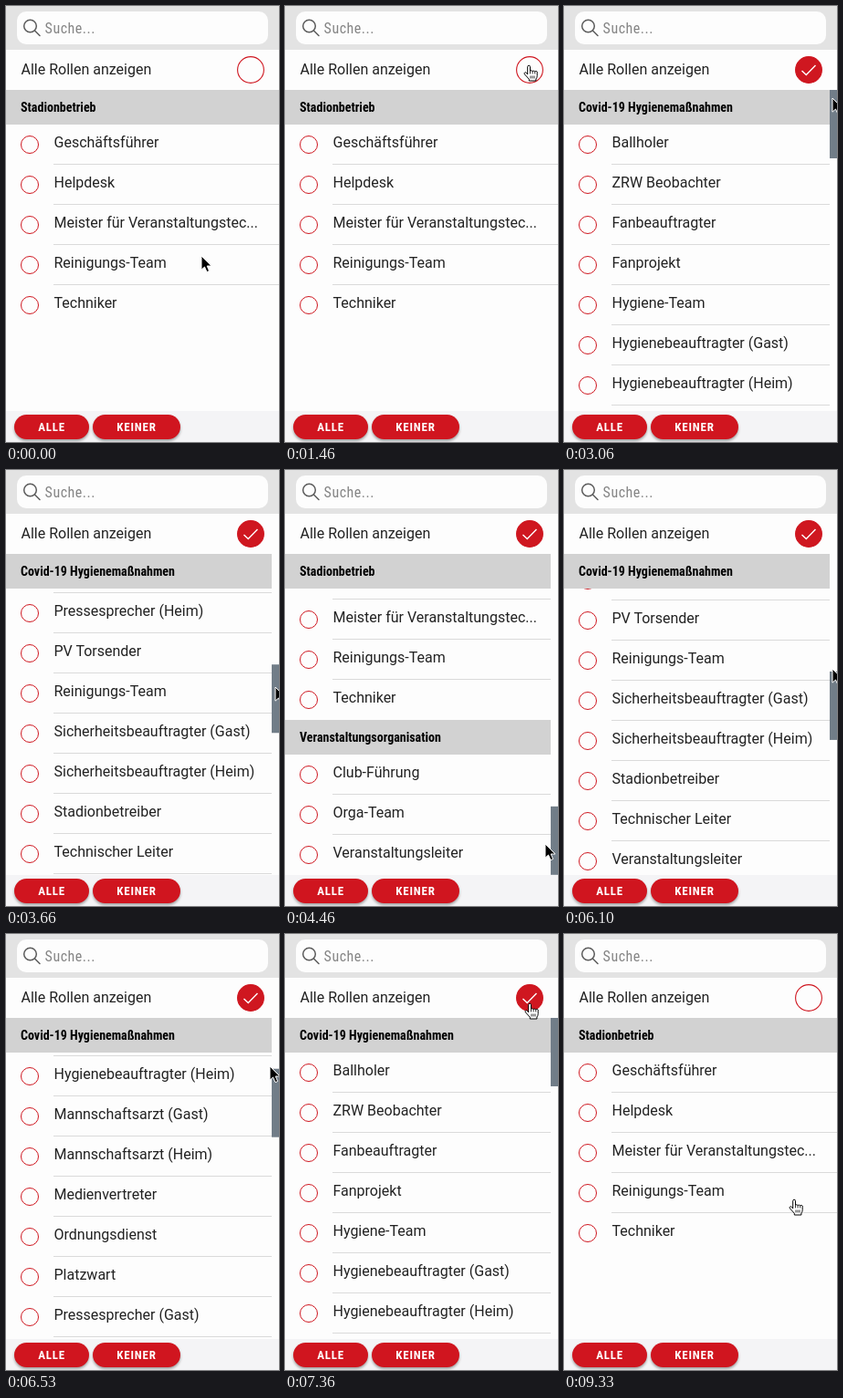
These frames come from a looping animation (299x478 px, 10000 ms). An HTML page:

```html
<!DOCTYPE html>
<html lang="de">
<head>
<meta charset="utf-8">
<title>Rollenauswahl</title>
<style>
  html, body { margin: 0; width: 100%; height: 100%; overflow: hidden; background: #fdfdfd; }
  body { position: relative; font: 16px/20px Roboto, sans-serif; color: #222; }
  body > *, .abs { position: absolute; box-sizing: border-box; }
  .condensed { font-family: "Roboto Condensed", Roboto, sans-serif; font-stretch: 75%; }

  #top { left: 0; top: 0; width: 100%; height: 48px; background: #e3e3e3; }
  #search { left: 12px; top: 6px; width: 275px; height: 36px; border-radius: 10px; background: #fdfdfd;
    padding: 9px 0 0 30.6px; color: #858585; letter-spacing: .5px; }
  #search svg { position: absolute; left: 5px; top: 6px; }
  #label { left: 16.5px; top: 60px; }
  #toggle { left: 253px; top: 55px; }

  #list { left: 0; top: 92px; height: 352px; overflow: hidden; }
  .head { position: sticky; top: 0; z-index: 1; height: 38px; padding-left: 16px; background: #d2d2d2;
    color: #000; font-weight: 700; font-size: 14px; line-height: 38px; white-space: nowrap; }
  .row { position: relative; height: 44px; }
  .row::before { content: ""; position: absolute; left: 16px; top: 12px; width: 20px; height: 20px;
    box-sizing: border-box; border: 1px solid #cf1720; border-radius: 50%; }
  .row span { position: absolute; left: 52px; right: 0; top: 0; height: 44px; box-sizing: border-box;
    padding: 10px 0 0 .5px; border-bottom: 1px solid #dadada; white-space: nowrap; }
  .row:last-child span { border: 0; }
  #thumb { right: 0; top: 92px; width: 8px; background: #717d88; }

  #bottom { left: 0; top: 444px; width: 100%; height: 34px; background: #f4f4f6; }
  .button { top: 4px; height: 27px; border-radius: 14px; background: #d0151f; color: #fff;
    font-weight: 700; font-size: 13px; line-height: 27px; letter-spacing: .78px; text-align: center;
    box-shadow: 0 2px 3px rgba(0, 0, 0, .35); }
  #cursor { left: 0; top: 0; width: 1px; height: 1px; overflow: visible; z-index: 5; }
</style>
</head>
<body>
  <div id="top">
    <div id="search" class="abs condensed">Suche...
      <svg width="24" height="24" fill="none" stroke="#5c5c5c" stroke-width="1.5" stroke-linecap="round">
        <circle cx="9.5" cy="10" r="6.8"/><path d="M14.5 15L20 20.5"/>
      </svg>
    </div>
  </div>
  <div id="label">Alle Rollen anzeigen</div>
  <svg id="toggle" width="30" height="30" fill="none">
    <circle cx="15" cy="15" r="14.4" stroke="#cf1720" stroke-width="1.1"/>
    <path d="M7.5 16L12.3 20.5L22.5 10" stroke="#fff" stroke-width="1.4"/>
  </svg>
  <div id="list"></div>
  <div id="thumb"></div>
  <div id="bottom">
    <div class="abs button condensed" style="left:9px;width:82px">ALLE</div>
    <div class="abs button condensed" style="left:95px;width:96px">KEINER</div>
  </div>
  <svg id="cursor">
    <path id="arrow" d="M0 0V15.2L3.5 12L6 17.6L8.6 16.5L6.2 11H11Z" fill="#000" stroke="#fff"/>
    <g id="hand" stroke="#000" stroke-linejoin="round">
      <path fill="#fff" d="M-1.3 10V1.6a1.4 1.4 0 0 1 2.8 0V6.4a1.4 1.2 0 0 1 2.6 .3a1.4 1.2 0 0 1 2.6 .6a1.3 1.3 0 0 1 2.5 .8V11.5q0 2-1.3 3.5V17H.3V15.2L-4.6 9.8q-.7-1.3 .4-2q1-.4 1.7 .6z"/>
      <path fill="none" stroke-width=".8" d="M1.5 6.4v3m2.6-2.7v2.7m2.6-2v2M2 11.5v3m2-3v3m2-3v3"/>
    </g>
  </svg>
<script>
const LOOP = 10000, CHECKED_AT = 1800, UNCHECKED_AT = 8100;
const VIEW = 352, SCROLL_LAG = 70, GRAB_Y = 101;

const groups = {
  'Covid-19 Hygienemaßnahmen': ['Ballholer', 'ZRW Beobachter', 'Fanbeauftragter', 'Fanprojekt',
    'Hygiene-Team', 'Hygienebeauftragter (Gast)', 'Hygienebeauftragter (Heim)',
    'Mannschaftsarzt (Gast)', 'Mannschaftsarzt (Heim)', 'Medienvertreter', 'Ordnungsdienst',
    'Platzwart', 'Pressesprecher (Gast)', 'Pressesprecher (Heim)', 'PV Torsender',
    'Reinigungs-Team', 'Sicherheitsbeauftragter (Gast)', 'Sicherheitsbeauftragter (Heim)',
    'Stadionbetreiber', 'Technischer Leiter', 'Veranstaltungsleiter'],
  'Sicherheit': ['Einsatzleiter', 'Feuerwehr', 'Ordnungsdienst', 'Polizei', 'Sanitätsdienst'],
  'Stadionbetrieb': ['Geschäftsführer', 'Helpdesk', 'Meister für Veranstaltungstec...',
    'Reinigungs-Team', 'Techniker'],
  'Veranstaltungsorganisation': ['Club-Führung', 'Orga-Team', 'Veranstaltungsleiter']
};

const steady = u => u;
const smooth = u => u * u * (3 - 2 * u);
const settle = u => 1 - (1 - u) ** 3;

const start = { x: 214, y: 274 };
const moves = [
  { from: 200, to: 1200, x: 267, y: 65, ease: smooth },    // to the toggle
  { from: 2030, to: 2560, x: 294, y: 101, ease: smooth },  // to the scrollbar
  { from: 3060, to: 3660, x: 295, y: 238, ease: steady },  // drag down
  { from: 3660, to: 4510, x: 284, y: 420, ease: steady },
  { from: 4930, to: 6100, x: 294, y: 218, ease: steady },  // drag up
  { from: 6100, to: 6860, x: 286, y: 89, ease: steady },
  { from: 7060, to: 7660, x: 265, y: 74, ease: settle },   // back to the toggle
  { from: 8360, to: 9330, x: 252, y: 291, ease: smooth }   // back to the list
];

const $ = id => document.getElementById(id);
const clamp = (v, lo, hi) => Math.min(hi, Math.max(lo, v));

function pointerAt(t) {
  return moves.reduce((p, { from, to, x, y, ease }) => {
    const k = ease(clamp((t - from) / (to - from), 0, 1));
    return { x: p.x + (x - p.x) * k, y: p.y + (y - p.y) * k };
  }, start);
}

function add(parent, tag, className, text = '') {
  const el = document.createElement(tag);
  el.className = className;
  el.textContent = text;
  return parent.appendChild(el);
}

const sections = Object.entries(groups).map(([title, roles]) => {
  const section = add($('list'), 'section', '');
  add(section, 'div', 'head condensed', title);
  roles.forEach(role => add(add(section, 'div', 'row'), 'span', '', role));
  return { section, extra: title !== 'Stadionbetrieb' };
});

const content = $('list').scrollHeight, maxScroll = content - VIEW;
const thumbHeight = VIEW * VIEW / content, maxThumb = VIEW - thumbHeight;
$('thumb').style.height = thumbHeight + 'px';
const [ring, tick] = $('toggle').children;
let shown;

function setChecked(checked) {
  if (checked === shown) return;
  shown = checked;
  sections.forEach(({ section, extra }) => section.hidden = extra && !checked);
  $('list').style.width = checked ? 'calc(100% - 8px)' : '100%';
  $('thumb').style.display = tick.style.display = checked ? '' : 'none';
  ring.setAttribute('fill', checked ? '#cf1720' : 'none');
}

function render(t) {
  setChecked(t >= CHECKED_AT && t < UNCHECKED_AT);

  const offset = shown ? clamp(pointerAt(t - SCROLL_LAG).y - GRAB_Y, 0, maxThumb) : 0;
  $('list').scrollTop = offset / maxThumb * maxScroll;
  $('thumb').style.transform = `translateY(${offset}px)`;

  const { x, y } = pointerAt(t);
  const onScrollbar = t > 2500 && t < 7060;
  const onHeader = y > 92 && y < 130;
  const hand = t >= 200 && !onScrollbar && !onHeader;
  $('cursor').style.transform = `translate(${Math.round(x)}px, ${Math.round(y)}px)`;
  $('hand').style.display = hand ? '' : 'none';
  $('arrow').style.display = hand ? 'none' : '';
}

function frame() {
  render(performance.now() % LOOP);
  requestAnimationFrame(frame);
}
frame();
</script>
</body>
</html>
```
